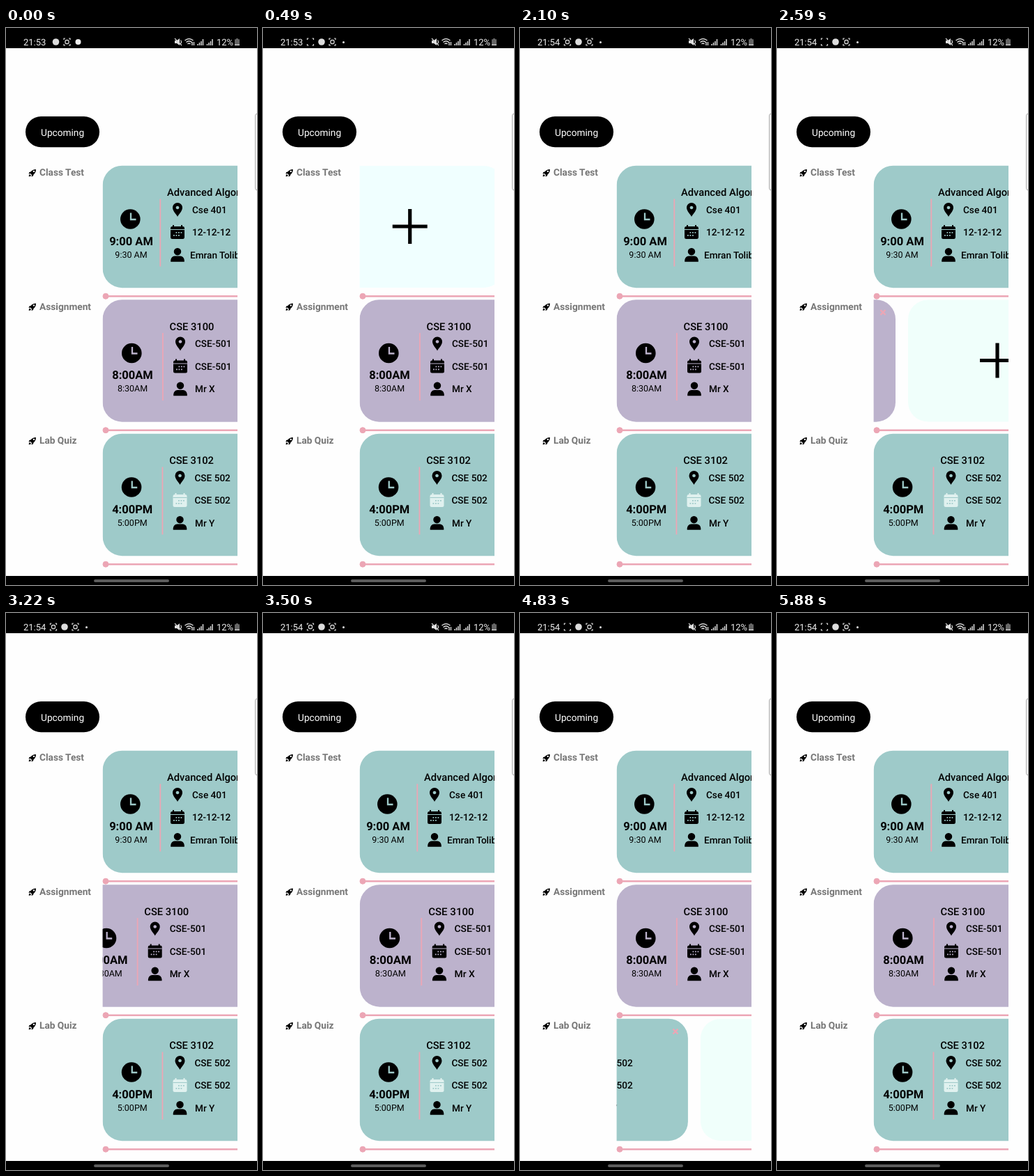
Animation, 360 px wide and 800 px high, one loop 5.95 s. Source, as an HTML page:

```html
<!DOCTYPE html>
<html lang="en">
<head>
<meta charset="utf-8">
<title>Upcoming schedule</title>
<style>
  html, body { margin: 0; width: 100%; height: 100%; overflow: hidden; background: #fefefe; }
  svg { display: block; width: 360px; height: 800px; font-family: Roboto, sans-serif; text-rendering: geometricPrecision; }
  .label { font-size: 13.7px; font-weight: 700; fill: #777; }
  .time { font-size: 16.5px; font-weight: 700; text-anchor: middle; }
  .until { font-size: 12.5px; text-anchor: middle; }
  .title { font-size: 14.7px; font-weight: 500; }
  .info { font-size: 13.6px; font-weight: 500; }
  .status { font-size: 13px; fill: #eee; }
</style>
</head>
<body>
<svg viewBox="0 0 360 800">
  <defs>
    <clipPath id="view"><rect x="138.600" y="190" width="193.400" height="580"/></clipPath>
    <path id="pin" fill-rule="evenodd" d="M0 10C-2 6-7 2-7-3A7 7 0 0 1 7-3C7 2 2 6 0 10ZM0-5.300a2.300 2.300 0 1 0 .01 0Z"/>
    <path id="person" d="M0-10a5.200 5.200 0 1 1-.01 0ZM-9.800 9.800V7.500Q-9 2-4 1.500H4Q9 2 9.800 7.500V9.800Z"/>
    <path id="rocket" fill-rule="evenodd" d="M5-5Q0-5-2.500-1.500L-4.500-1-5.500 1.500-3 1-1 3-1.500 5.500 1 4.500 1.500 2.500Q5 0 5-5ZM2-3.300a1.200 1.200 0 1 1-.01 0ZM-4 2Q-5.500 3-5.300 5.300-3 5.500-2 4Z"/>
    <path id="brackets" fill="none" stroke="#ddd" stroke-width="1.200" d="M-2.500-5H-4.500V-3M2.500-5H4.500V-3M-2.500 5H-4.500V3M2.500 5H4.500V3"/>
    <g id="recorder"><use href="#brackets"/><rect x="-2.500" y="-2.500" width="5" height="5" rx="1.500" fill="none" stroke="#ddd" stroke-width="1.300"/></g>
    <path id="bars" stroke="#ddd" stroke-width="1.500" d="M-4 5V3M-1.500 5V1M1-1V5M3.500-4V5"/>
  </defs>

  <rect width="360" height="29"/>
  <text id="clock" class="status" x="25" y="24.500"></text>
  <g id="early">
    <circle cx="71.500" cy="20" r="4.800" fill="#ddd"/>
    <use href="#recorder" x="87.500" y="20"/>
    <circle cx="103.500" cy="20" r="4" fill="#eee"/>
  </g>
  <g id="late">
    <use href="#brackets" x="68" y="20"/>
    <rect id="blink" x="65.500" y="17.500" width="5" height="5" rx="1.500" fill="none" stroke="#ddd" stroke-width="1.300"/>
    <circle cx="84" cy="20" r="4.800" fill="#ddd"/>
    <use href="#recorder" x="99.500" y="20"/>
    <circle cx="115.500" cy="20.500" r="1.500" fill="#eee"/>
  </g>
  <path fill="#ddd" d="M242 18h3l4-3v10l-4-3h-3Z"/>
  <path fill="none" stroke="#ddd" stroke-width="1.200" d="M242 15l10 10M250.500 17.500q2 2.500 0 5"/>
  <path fill="none" stroke="#ddd" stroke-width="1.400" d="M256.500 18q6-5 12 0M258.500 20.500q4-3.500 8 0M260.500 23q2-2 4 0M267 20v5M269.500 20v5"/>
  <use href="#bars" x="279" y="20"/>
  <use href="#bars" x="292.500" y="20"/>
  <text class="status" x="302" y="24.500">12%</text>
  <path fill="#666" d="M330 15h3v1.300h2V25h-7v-8.700h2Z"/>
  <path fill="#ddd" d="M328 23.700h7V25h-7Z"/>

  <rect x="28" y="127" width="106" height="44.300" rx="22.150"/>
  <text x="50" y="155.300" font-size="13.700" fill="#fff">Upcoming</text>
  <rect x="357.500" y="123" width="8" height="110" rx="3" fill="#f8f8f8" stroke="#aaa"/>

  <g id="labels"></g>
  <g id="rows" clip-path="url(#view)"></g>
  <g id="rules" fill="#eca6b5" stroke="#eca6b5"></g>

  <rect y="787" width="360" height="13"/>
  <rect x="126" y="792" width="108" height="4" rx="2" fill="#5c5c5c"/>
</svg>
<script>
const LOOP = 5950, MAX = 349, PINK = '#eca6b5';
const TEAL = '#9ecac9', LILAC = '#bcb2cc';
const $ = id => document.getElementById(id);

// swipe: start of the outward swipe, end of the return, overshoot in px, stretch
const rows = [
  { label: 'Class Test', fill: TEAL, tile: '#f0ffff', ink: '#000', dx: 0,
    time: '9:00 AM', until: '9:30 AM', title: 'Advanced Algorithms',
    info: ['Cse 401', '12-12-12', 'Emran Tolibur'], nameX: 125, swipe: [90, 1250, 5, .022] },
  { label: 'Assignment', fill: LILAC, tile: '#f0fffb', ink: '#000', dx: 4,
    time: '8:00AM', until: '8:30AM', title: 'CSE 3100',
    info: ['CSE-501', 'CSE-501', 'Mr X'], nameX: 132, swipe: [2409, 3350, .3, .024] },
  { label: 'Lab Quiz', fill: TEAL, tile: '#f0fffb', ink: '#e0f1ef', dx: 3.5,
    time: '4:00PM', until: '5:00PM', title: 'CSE 3102',
    info: ['CSE 502', 'CSE 502', 'Mr Y'], nameX: 132, swipe: [4720, 5500, .3, .02] }
];

const text = (cls, x, y, s) => `<text class="${cls}" x="${x}" y="${y}">${s}</text>`;

function calendar(x, y, ink, back) {
  let dots = '';
  for (let i = 1; i < 7; i++)
    dots += `M${-6 + i % 4 * 3.5} ${i < 4 ? 0 : 4}h1.800v1.800h-1.800Z`;
  return `<g transform="translate(${x} ${y})">
    <rect x="-10" y="-8" width="20" height="18" rx="2.5" fill="${ink}"/>
    <path d="M-6-10v4M6-10v4" stroke="${ink}" stroke-width="2"/>
    <path d="M-10-3.500H10" stroke="${back}"/><path d="${dots}" fill="${back}"/></g>`;
}

function card(r) {
  const icon = 107 + r.dx, half = r.dx / 2;
  return `<rect x="-.4" y="-.3" width="262.400" height="175.500" rx="28" fill="${r.fill}"/>
    <circle cx="${39.3 + half}" cy="76.500" r="14.300"/>
    <path d="M${40 + half} 67.500v9.500h7.500" fill="none" stroke="${r.fill}" stroke-width="2.300"/>
    ${text('time', 40.5 + half, 113.5, r.time)}
    ${text('until', 40.5 + half, 131.5, r.until)}
    <path d="M${82.3 + r.dx * .9} 47.500v97" stroke="${PINK}" stroke-width="1.800"/>
    ${text('title', 92 + r.dx * .9, 43.3, r.title)}
    <use href="#pin" x="${icon}" y="63"/>
    ${calendar(icon, 95, r.ink, r.fill)}
    <use href="#person" x="${icon}" y="128"/>
    ${text('info', 128 + r.dx, 67.7, r.info[0])}
    ${text('info', 128 + r.dx, 100.2, r.info[1])}
    ${text('info', r.nameX, 132.8, r.info[2])}
    <path d="M240.500 14.500l7 7m0-7l-7 7" stroke="${PINK}" stroke-width="2.400"/>
    <rect x="280" width="262" height="175" rx="28" fill="${r.tile}"/>
    <path d="M383 87h50M408 62v50" stroke="#000" stroke-width="5.200"/>`;
}

rows.forEach((r, i) => {
  r.y = 198 + i * 192.5;
  const rule = r.y + 187.2;
  $('labels').innerHTML += `<use href="#rocket" x="38" y="${r.y + 10}"/>` + text('label', 48, r.y + 14.2, r.label);
  $('rules').innerHTML += `<circle cx="143" cy="${rule}" r="4"/>
    <path d="M143 ${rule}H332" stroke-width="2.500"/>`;
  $('rows').innerHTML += `<g>${card(r)}</g>`;
});

const clamp = u => Math.min(1, Math.max(0, u));
const easeOut = (u, n) => 1 - (1 - clamp(u)) ** n;
const show = (id, on) => $(id).setAttribute('visibility', on ? 'visible' : 'hidden');

function draw(t) {
  rows.forEach((r, i) => {
    const [start, end, over, stretch] = r.swipe;
    const out = easeOut((t - start) / 600, 3);
    const back = easeOut((t - end + 400) / 400, 2);
    const bounce = Math.sin(Math.PI * clamp((t - end) / 300));
    const x = 139 - MAX * out * (1 - back) + over * bounce;
    $('rows').children[i].setAttribute('transform',
      `translate(${x} ${r.y}) scale(${1 + stretch * bounce} 1)`);
  });
  const phase = t % 1050, early = t < 210;
  $('clock').textContent = t < 2000 ? '21:53' : '21:54';
  show('early', early);
  show('late', !early);
  show('blink', !early && (phase < 420 || phase > 945));
}

const begin = performance.now();
function tick() {
  draw((performance.now() - begin) % LOOP);
  requestAnimationFrame(tick);
}
tick();
</script>
</body>
</html>
```
